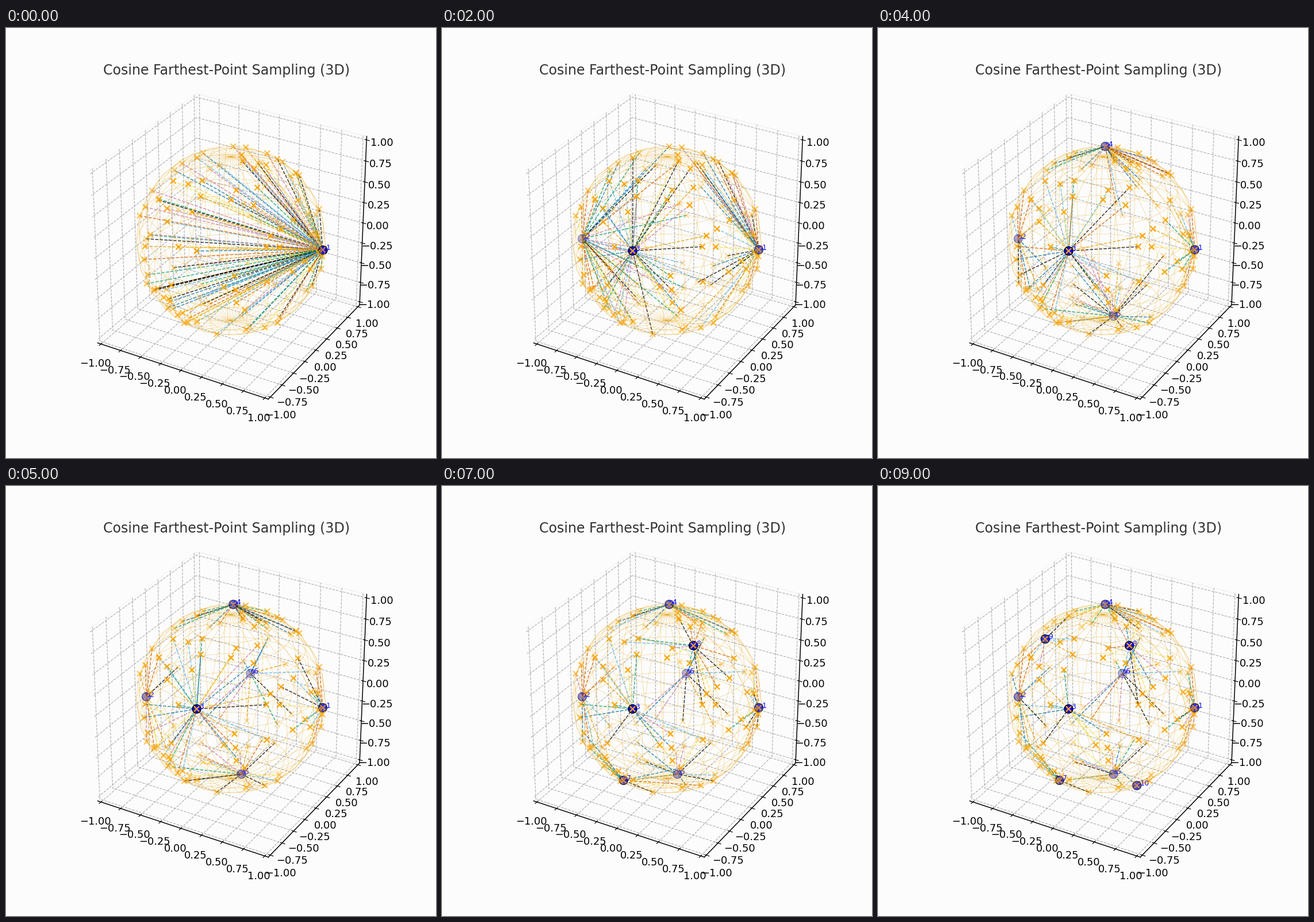
Animation, 748 px wide and 748 px high, one loop 10000 ms. Source, as a matplotlib script:

```python
import numpy as np
import matplotlib.pyplot as plt
from matplotlib.animation import FuncAnimation

SIZE, DPI = 748, 107
N_POINTS, N_SAMPLES = 120, 10
BACK = "#fcfcfc"
CYCLE = ["#000000", "#E69F00", "#56B4E9", "#009E73",
         "#F0E442", "#0072B2", "#D55E00", "#CC79A7"]

plt.rcParams.update({
    "font.family": "DejaVu Sans",
    "grid.linestyle": "--", "grid.color": "#b0b0b0", "grid.linewidth": 0.8,
    "axes.linewidth": 1.0, "axes.edgecolor": "black",
})


def sphere_points(n):
    rng = np.random.RandomState(3)
    p = rng.randn(n, 3)
    return p / np.linalg.norm(p, axis=1, keepdims=True)


def farthest_order(cos, count):
    """Greedy pick of the point least similar to those already picked."""
    order = [0]
    while len(order) < count:
        order.append(int(np.argmin(cos[:, order].max(axis=1))))
    return order


points = sphere_points(N_POINTS)
cos = points @ points.T
order = farthest_order(cos, N_SAMPLES)

inches = (SIZE + 0.01) / DPI  # guards against rounding down a pixel
fig = plt.figure(figsize=(inches, inches), dpi=DPI, facecolor=BACK)
ax = fig.add_subplot(projection="3d", facecolor=BACK)
ax.set_box_aspect((1, 1, 1))
ax.set_title("Cosine Farthest-Point Sampling (3D)", fontsize=16, color="#333333")

ticks = np.linspace(-1, 1, 9)
for axis in (ax.xaxis, ax.yaxis, ax.zaxis):
    axis.set_ticks(ticks)
    axis.set_tick_params(labelsize=12)
    axis.pane.fill = False

u, v = np.mgrid[0:2 * np.pi:30j, 0:np.pi:15j]
ax.plot_wireframe(np.cos(u) * np.sin(v), np.sin(u) * np.sin(v), np.cos(v),
                  color="#E69F00", alpha=0.4, linewidth=0.5)

limit = 1 + 1 / 24
ax.set(xlim=(-limit, limit), ylim=(-limit, limit), zlim=(-limit, limit))

live = []


def update(step):
    while live:
        live.pop().remove()
    chosen = order[:step + 1]
    rest = [i for i in range(N_POINTS) if i not in chosen]
    for rank, i in enumerate(rest):
        near = chosen[int(np.argmax(cos[i, chosen]))]
        live.extend(ax.plot(*points[[i, near]].T, "--", linewidth=1, alpha=0.8,
                            color=CYCLE[rank % len(CYCLE)]))
    live.append(ax.scatter(*points[chosen].T, c="blue", s=100, edgecolors="black"))
    live.append(ax.scatter(*points.T, c="orange", marker="x", s=40))
    for k, i in enumerate(chosen, 1):
        live.append(ax.text(*points[i], f"s{k}", color="blue", fontsize=8))
    return live


anim = FuncAnimation(fig, update, frames=N_SAMPLES, interval=1000,
                     init_func=lambda: live, repeat=True, repeat_delay=0)
plt.show()
```
